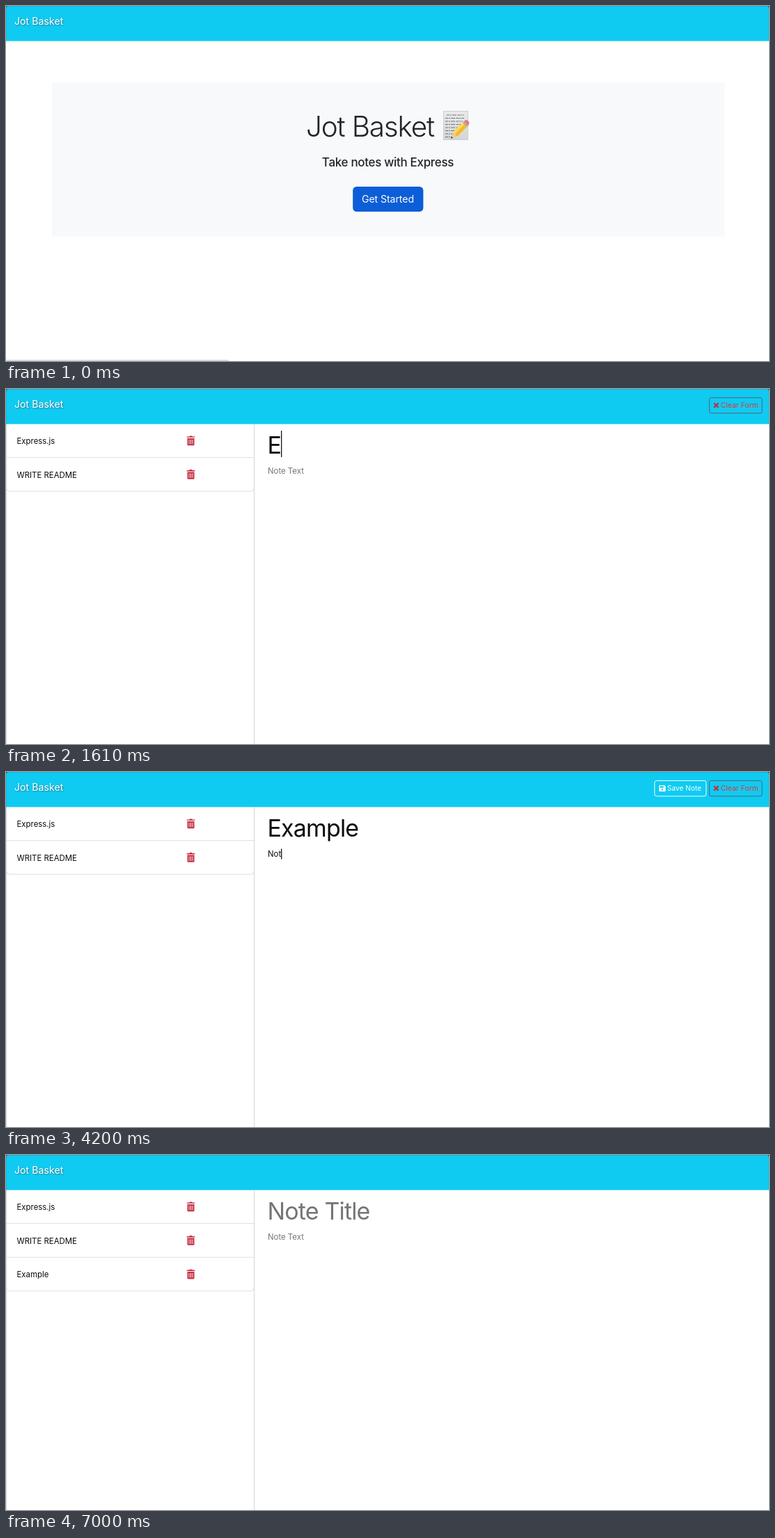
Write an HTML page that moves like this. It is 1096 px wide and 511 px high and loops after 8000 ms.

```html
<!DOCTYPE html>
<html lang="en">
<head>
<meta charset="utf-8">
<title>Jot Basket</title>
<style>
  html, body { margin: 0; width: 100%; height: 100%; overflow: hidden; background: #fff; }
  svg { display: block; width: 1096px; height: 511px; }
  text { font: 11.4px Inter, "Open Sans", sans-serif; font-optical-sizing: none; fill: #0b0b0b; }
  .mid { text-anchor: middle; }
  #brand { font-size: 14.2px; fill: #fff; text-shadow: 1px 1px 2px rgba(70, 90, 100, .75); }
  #hero { font-size: 40.5px; font-weight: 300; letter-spacing: -1.2px; fill: #212529; }
  #lead { font-size: 17px; font-weight: 500; letter-spacing: -.32px; fill: #212529; }
  #start { font-size: 14.2px; letter-spacing: -.12px; fill: #fff; }
  #title { font-size: 34px; letter-spacing: -.85px; }
  #title.empty, #note.empty { fill: #757575; }
  .btn { font-size: 10px; letter-spacing: .08px; }
  #clear text { letter-spacing: .2px; fill: #91505d; text-shadow: 1px 1px 1px rgba(240, 130, 140, .55); }
</style>
</head>
<body>
<svg viewBox="0 0 1096 511">
  <defs>
    <linearGradient id="paper" x2="0" y2="1">
      <stop stop-color="#e9eaea"/><stop offset="1" stop-color="#d3d5d6"/>
    </linearGradient>
    <g id="trash">
      <path fill="#c42c3d" d="M0 .9h3.500l.7-.9h3.200l.7.9h3.500v1.400H0zM.8 3.400h10v9.100q0 1.200-1.200 1.200H2q-1.200 0-1.200-1.200z"/>
      <path stroke="#fff" stroke-width=".9" d="M3.300 5.200v6.700M5.800 5.200v6.700M8.300 5.200v6.700"/>
    </g>
  </defs>

  <rect width="1096" height="50.500" fill="#0fcbf2"/>
  <path fill="none" stroke="#39515a" stroke-opacity=".2" d="M.5 51V.5H1096"/>
  <path fill="#39515a" d="M0 0h4Q0 0 0 4zM1096 0h-4q4 0 4 4z"/>
  <text id="brand" x="12" y="27">Jot Basket</text>

  <g id="home">
    <rect x="66" y="110.500" width="966.500" height="221.500" fill="#f8f9fb"/>
    <text id="hero" class="mid" x="523" y="187.500">Jot Basket</text>
    <g id="memo">
      <rect x="628.500" y="151.500" width="35" height="41" fill="url(#paper)" stroke="#c6c8c9" stroke-width=".8"/>
      <path fill="none" stroke="#55585a" stroke-width=".8" stroke-dasharray="4 1 2 1 6 1.500"
        d="M633 157h25M631 161.500h27M631 166h25M631 170.500h22M631 175h17M631 179.500h13M631 184h12M631 188.500h10"/>
      <path fill="#f5b92f" d="M642 182l15-15 6 6-15 15z"/>
      <path fill="#ffda55" d="M642 182l15-15 2.500 2.500-15 15z"/>
      <path fill="#edc89b" d="M642 182l6 6-9 3z"/>
      <path fill="#333" d="M640 187.800l1.900 1.900-3 1.200z"/>
      <path fill="#a9adb0" d="M656 168l2-2 6 6-2 2z"/>
      <path fill="#ee7480" d="M658 166l1.500-1.500q2-1.500 4.500 1t1 4.500l-1 2z"/>
    </g>
    <text id="lead" class="mid" x="548.500" y="231.400">Take notes with Express</text>
    <rect x="498.200" y="260" width="101.200" height="36" rx="5.500" fill="#0b5ed7"/>
    <text id="start" class="mid" x="548.500" y="283.300">Get Started</text>
    <path fill="#d8d8d8" d="M0 509.200h317q3 0 3.500 1.800H0z"/>
  </g>

  <g id="app">
    <path stroke="#d4d6d8" d="M.5 51v460M356.500 51v460"/>
    <g id="list"></g>
    <text id="title" x="375.500" y="92.700"></text>
    <text id="note" x="376" y="122.400"></text>
    <rect id="caret" width="1.200"/>
    <g id="save">
      <rect id="saveBox" x="931.700" y="12.500" width="74" height="22.300" rx="2.800" stroke="#f8f9fa"/>
      <g id="saveInk">
        <path fill-rule="evenodd" d="M939 19h6.700l1.800 1.800V27q0 1-1 1H939q-1 0-1-1v-7q0-1 1-1zM939.300 20.300v2.400h5.200v-2.400zM942.700 24.100a1.300 1.300 0 1 0 .01 0z"/>
        <text class="btn" x="949.700" y="27.200" style="fill:inherit">Save Note</text>
      </g>
    </g>
    <g id="clear">
      <rect x="1010.300" y="12.500" width="75.700" height="22.300" rx="2.800" fill="none" stroke="#58636d"/>
      <path stroke="#c52f42" stroke-width="2.300" d="M1017 20.200l6.400 6.400m0-6.400l-6.400 6.400"/>
      <text class="btn" x="1026.700" y="27.200">Clear Form</text>
    </g>
  </g>
</svg>
<script>
const $ = id => document.getElementById(id);
const show = (id, on) => $(id).style.display = on ? "" : "none";

const items = ["Express.js", "WRITE README", "Example"];
const titleKeys = [1540, 1960, 2100, 2310, 2450, 2660, 2800];
const noteKeys = [3710, 4060, 4200, 4690];
const HOME_END = 280, LIST = 350, FOCUS = 1050, TAB = 3220, BLUR = 5320,
      HOVER = 5600, SAVED = 6720, ADDED = 7000;

// The lower edge of the last row has rounded corners.
function drawList(count) {
  $("list").innerHTML = items.slice(0, count).map((name, i) => {
    const y = 50 + i * 48.6, low = y + 48.6;
    const edge = i === count - 1
      ? `M1 ${low - 4}q0 4 4 4h347q4 0 4-4` : `M1 ${low}h355`;
    return `<text x="15.500" y="${y + 29}">${name}</text>
      <use href="#trash" x="259.700" y="${y + 17.5}"/>
      <path fill="none" stroke="#dcdfe2" d="${edge}"/>`;
  }).join("");
}

function typed(id, word, keys, hint, t) {
  const text = t < SAVED ? word.slice(0, keys.filter(k => t >= k).length) : "";
  const el = $(id);
  el.textContent = text || hint;
  el.classList.toggle("empty", !text);
  return text;
}

function placeCaret(id, text, top, height) {
  const el = $(id);
  const x = +el.getAttribute("x") + (text ? el.getComputedTextLength() : 0.7);
  const caret = $("caret");
  caret.setAttribute("x", x);
  caret.setAttribute("y", top);
  caret.setAttribute("height", height);
}

let rows = -1;
function draw(now) {
  const t = now % 8000;
  show("home", t < HOME_END);
  show("app", t >= HOME_END);

  const count = t < LIST ? 0 : t < ADDED ? 2 : 3;
  if (count !== rows) drawList(rows = count);

  const title = typed("title", "Example", titleKeys, "Note Title", t);
  const note = typed("note", "Note", noteKeys, "Note Text", t);
  show("clear", title);
  show("save", note);

  show("caret", t >= FOCUS && t < BLUR);
  if (t >= HOME_END) {
    if (t < TAB) placeCaret("title", title, 60, 38);
    else placeCaret("note", note, 110.5, 15);
  }

  const step = Math.floor((t - HOVER) / 70) + 1;
  const hover = Math.min(1, Math.max(0, step / 3));
  const ink = Math.round(255 * (1 - hover));
  $("saveBox").setAttribute("fill", `rgba(248,249,250,${hover})`);
  $("saveInk").setAttribute("fill", `rgb(${ink},${ink},${ink})`);

  requestAnimationFrame(draw);
}
requestAnimationFrame(draw);
</script>
</body>
</html>
```
